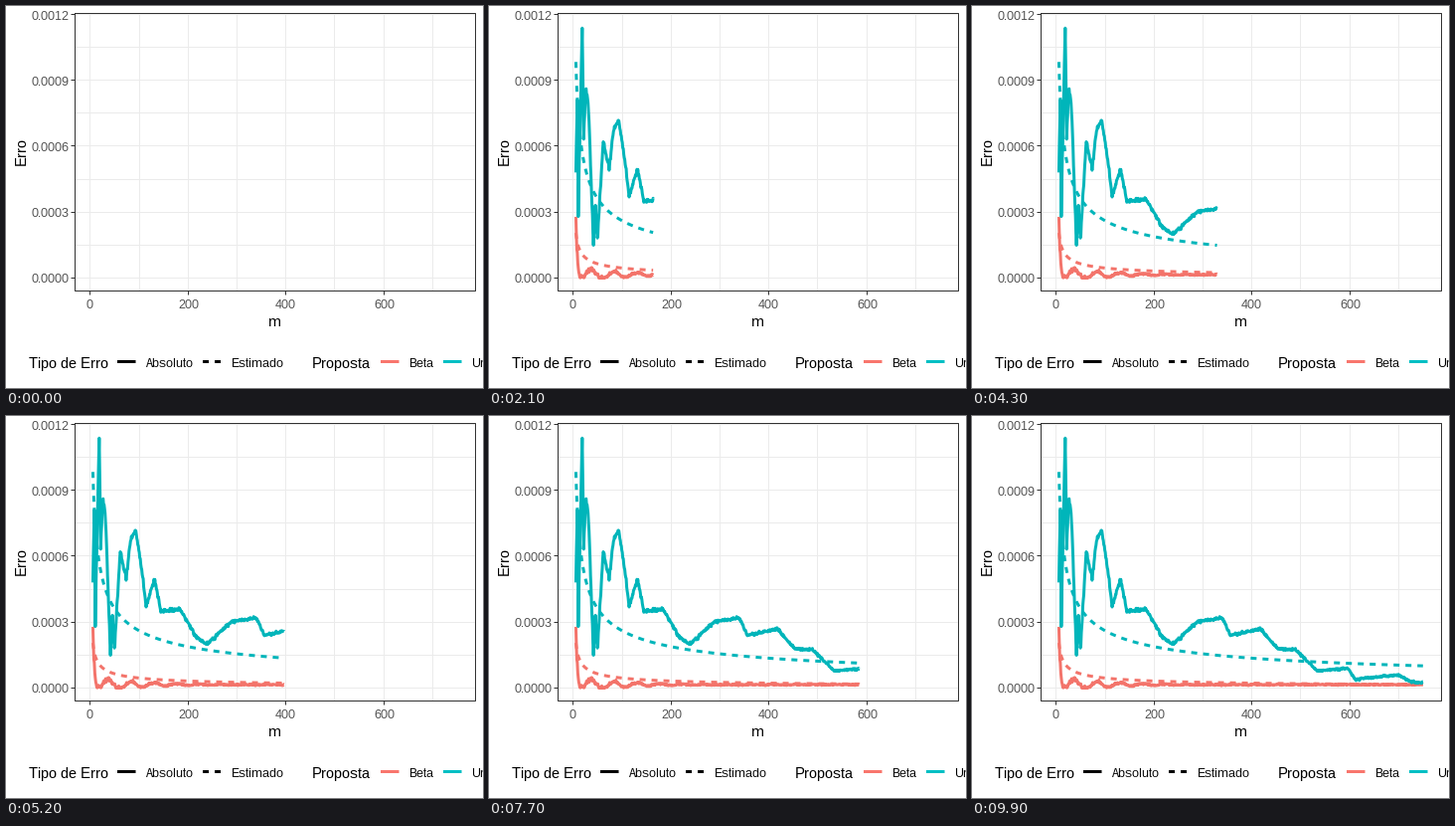
Recreate the animation shown at these times as a matplotlib script. Size 480 by 384 pixels, loop 10000 ms.

```python
import matplotlib.pyplot as plt
import numpy as np
from matplotlib.animation import FuncAnimation

W, H, DPI = 480, 384, 96
FRAMES, INTERVAL = 100, 100
PX = 72 / DPI  # points per pixel

plt.rcParams.update({
    "font.family": "Liberation Sans",
    "text.hinting": "default",
    "text.hinting_factor": 1,
    "path.simplify": False,
    "path.snap": False,
})

BETA, UNIF = "#F8766D", "#00BFC4"
BETA_LINE, UNIF_LINE = "#F3746B", "#00B5BA"
GRID, DARK, GREY = "#EBEBEB", "#333333", "#4D4D4D"
LEFT, RIGHT, TOP, BOTTOM = 69.5, 472.5, 7.5, 286.5
M_MIN, M_MAX = 5, 750
DASHED = (0, (2, 2))

fig = plt.figure(figsize=(W / DPI, H / DPI), dpi=DPI, facecolor="white")
ax = fig.add_axes([0, 0, 1, 1])
ax.set(xlim=(0, W), ylim=(H, 0))
ax.axis("off")


def px(m):
    return 84.95 + 0.4918 * m


def py(err):
    return 273.6 - err * 221300


def rule(x, y, color, width=1, dash="-", z=1):
    return ax.plot(x, y, color=color, lw=width * PX, ls=dash, zorder=z,
                   solid_capstyle="butt", dash_capstyle="butt",
                   solid_joinstyle="round", dash_joinstyle="round")[0]


def label(x, y, text, size=12, color="black", **kw):
    ax.text(x, y, text, fontsize=size * PX, color=color, va="baseline", **kw)


def draw_panel():
    for m in range(0, 701, 100):
        x = np.floor(px(m)) + 0.5
        rule([x, x], [TOP, BOTTOM], GRID)
        if m % 200 == 0:
            rule([x, x], [BOTTOM, BOTTOM + 4], DARK)
            label(x, 304.5, str(m), color=GREY, ha="center")
    for i in range(9):
        y = np.floor(py(i * 0.00015)) + 0.5
        rule([LEFT, RIGHT], [y, y], GRID)
        if i % 2 == 0:
            rule([LEFT - 4, LEFT], [y, y], DARK)
            label(63.5, y + 5, f"{i * 0.00015:.4f}", color=GREY, ha="right")
    rule([LEFT, RIGHT, RIGHT, LEFT, LEFT],
         [TOP, TOP, BOTTOM, BOTTOM, TOP], DARK, z=5)
    label(270.5, 321.5, "m", 15, ha="center")
    label(20, 145.5, "Erro", 15, rotation=90, rotation_mode="anchor",
          ha="center")


def draw_legend():
    label(23, 364, "Tipo de Erro", 15)
    label(308, 364, "Proposta", 15)
    for x, text, color, dash in [(112, "Absoluto", "black", "-"),
                                 (198, "Estimado", "black", DASHED),
                                 (377, "Beta", BETA, "-"),
                                 (440, "Uniforme", UNIF, "-")]:
        rule([x, x + 18.5], [357.5, 357.5], color, 3, dash)
        label(x + 28.5, 363, text, clip_on=True)


rng = np.random.default_rng(7)
m = np.arange(M_MIN, M_MAX + 1)


def wobble(size):
    """Sampling noise that shrinks like the error of a running mean."""
    return rng.normal(0, size, m.size) * np.sqrt(200 / m)


# Main turns of the uniform proposal's error: (m, error * 1e4).
TURNS = [(5, 4.8), (8, 8.3), (10, 3), (18, 11.5), (21, 6.5), (25, 8.8),
         (31, 7.8), (41, 1.5), (45, 3.3), (49, 1.7), (61, 6.2), (73, 5),
         (82, 6.7), (92, 7.2), (104, 5.6), (114, 3.7), (131, 5), (144, 3.5),
         (183, 3.6), (214, 2.4), (238, 2), (287, 3), (339, 3.2), (356, 2.4),
         (417, 2.7), (453, 1.8), (490, 1.75), (533, 0.8), (596, 0.9),
         (612, 0.4), (697, 0.6), (726, 0.3), (750, 0.25)]
turn_m, turn_err = np.transpose(TURNS)
unif_abs = np.interp(m, turn_m, turn_err) * 1e-4 + wobble(4.5e-6)
unif_est = 0.00228 * (m + 1) ** -0.47

swing = 4e-5 * np.cos(2 * np.pi * (m - 37) / 47) * np.exp(-m / 80)
beta_abs = np.abs(2.6e-4 * np.exp((M_MIN - m) / 3.5) + 1.6e-5
                  + swing + wobble(2.2e-6))
beta_est = 0.00046 / np.sqrt(m)

draw_panel()
draw_legend()
curves = [(rule([], [], color, 3, dash, z=3), err)
          for color, dash, err in [(BETA_LINE, "-", beta_abs),
                                   (BETA_LINE, DASHED, beta_est),
                                   (UNIF_LINE, "-", unif_abs),
                                   (UNIF_LINE, DASHED, unif_est)]]


def update(i):
    """Reveal every curve up to the current value of m."""
    end = M_MIN + (M_MAX - M_MIN) * i / (FRAMES - 1)
    shown = np.append(m[m < end], end) if i else np.array([])
    for line, err in curves:
        line.set_data(px(shown), py(np.interp(shown, m, err)))
    return [line for line, _ in curves]


anim = FuncAnimation(fig, update, frames=FRAMES, interval=INTERVAL,
                     init_func=lambda: update(0), repeat=True, repeat_delay=0)
plt.show()
```
